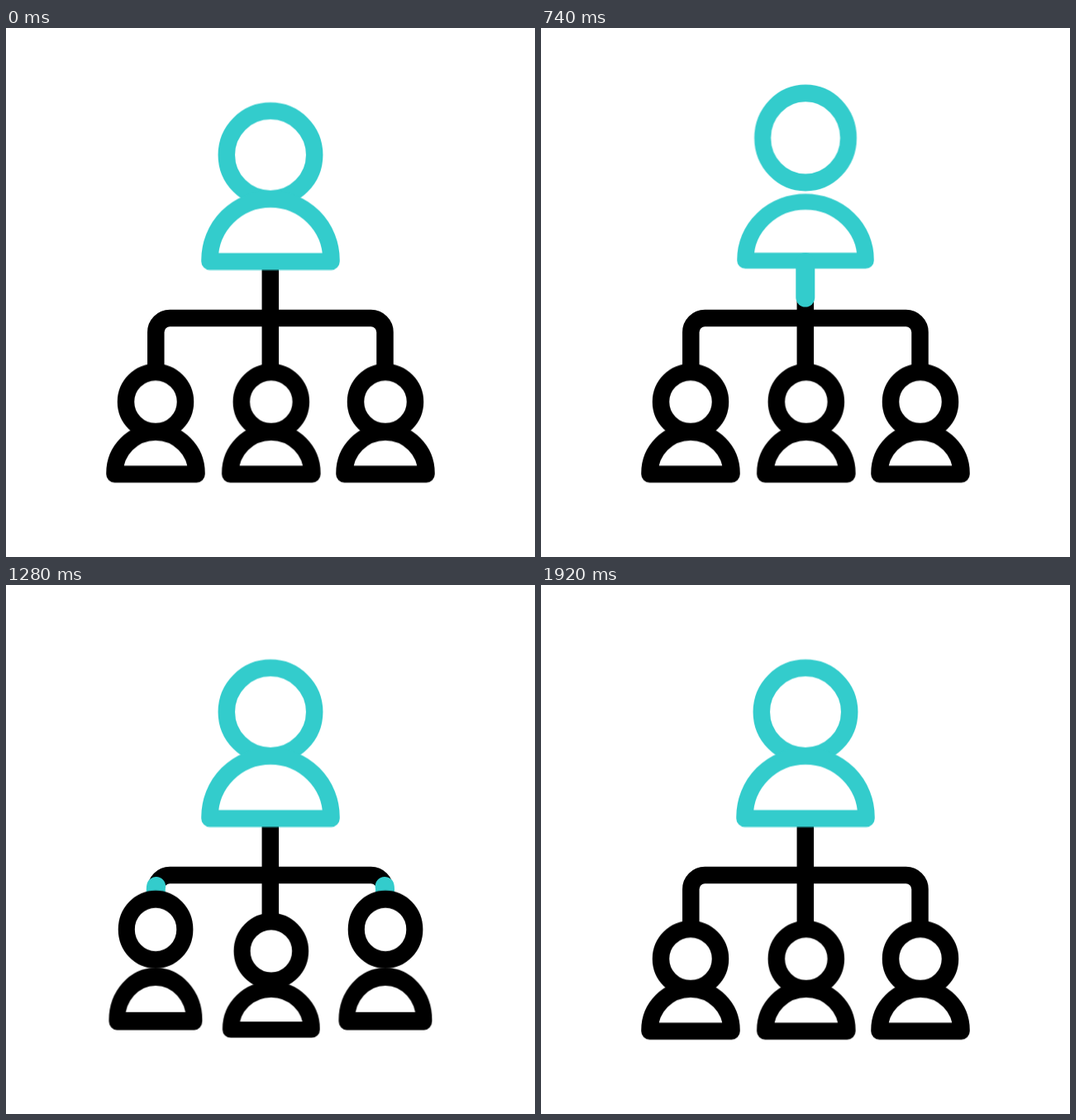
Recreate the animation shown at these times as an HTML page without scripts. Size 640 by 640 pixels, loop 1.96 s.

```html
<!DOCTYPE html>
<html lang="en">
<head>
<meta charset="utf-8">
<title>Team hierarchy</title>
<style>
  html, body { margin: 0; width: 100%; height: 100%; overflow: hidden; background: #fff; }
  svg { display: block; width: 100%; height: 100%; }

  .person, .links, .pulse { stroke-width: 20.5; stroke: #000; }
  .person { fill: #fff; stroke-linejoin: round; }
  .links, .pulse { fill: none; }
  .leader, .pulse { stroke: #3cc; }

  .leader { --start: 260ms; }
  .middle { --start: 770ms; }
  .side { --start: 900ms; }

  .head, .body {
    transform-box: fill-box;
    animation: head 1960ms linear var(--start) infinite;
  }
  .head { transform-origin: 50% 50%; }
  .body { transform-origin: 50% 100%; animation-name: body; }

  /* crouch, jump, land, small rebound */
  @keyframes head {
    0% { transform: none; animation-timing-function: ease-in; }
    8.16% { transform: translateY(4px) scale(1, .965); animation-timing-function: ease-out; }
    10.2% { transform: translateY(6.5px) scale(1, .955); animation-timing-function: ease-in; }
    13.27% { transform: translateY(-.5px) scale(1, .96); }
    16.84% { transform: translateY(-25px) scale(.98, 1.02); animation-timing-function: ease-out; }
    19.9% { transform: translateY(-36px) scale(.98, 1.02); animation-timing-function: ease-in; }
    24.49% { transform: translateY(-21px) scale(.976, 1.016); }
    26.53% { transform: translateY(-6px) scale(.98, .99); }
    29.6% { transform: translateY(7px) scale(1, .94); animation-timing-function: ease-out; }
    33.16% { transform: translateY(10px) scale(1, .912); }
    34.69% { transform: translateY(3.5px) scale(1, .93); animation-timing-function: ease-out; }
    38.78% { transform: translateY(-4px); animation-timing-function: ease-in-out; }
    45.92% { transform: translateY(-.7px); }
    48.98%, 100% { transform: none; }
  }
  @keyframes body {
    0% { transform: none; }
    8.16% { transform: translateY(-1px) scale(1, .96); }
    10.2% { transform: translateY(-1px) scale(1, .95); animation-timing-function: ease-in; }
    13.27% { transform: translateY(-5.5px) scale(1, .97); animation-timing-function: ease-out; }
    17.86% { transform: translateY(-13px) scale(.945, 1.055); }
    19.9% { transform: translateY(-12px) scale(.945, 1.055); animation-timing-function: ease-in; }
    24.49% { transform: translateY(-1px) scale(.988, .943); }
    26.53% { transform: translateY(-2px) scale(.985, .96); }
    33.16% { transform: translateY(-1px) scale(1, .945); }
    34.69% { transform: translateY(-4.8px); animation-timing-function: ease-out; }
    37.24% { transform: translateY(-6px); animation-timing-function: ease-in-out; }
    44.9%, 100% { transform: none; }
  }

  .pulse { stroke-width: 23; stroke-linecap: round; opacity: 0; stroke-dasharray: 0 2; }
  .trunk { animation: trunk 1960ms linear 660ms infinite; }
  .branch { animation: branch 1960ms linear 780ms infinite; }
  @keyframes trunk {
    0% { opacity: 1; stroke-dasharray: 0 2; stroke-dashoffset: 0; }
    13.27%, 16.84% { stroke-dasharray: 1 2; stroke-dashoffset: 0; }
    30.1% { opacity: 1; stroke-dasharray: 0 2; stroke-dashoffset: -1; }
    30.11%, 100% { opacity: 0; stroke-dasharray: 0 2; stroke-dashoffset: -1; }
  }
  @keyframes branch {
    0% { opacity: 1; stroke-dasharray: 0 2; stroke-dashoffset: 0; }
    13.78%, 15.31% { stroke-dasharray: 1 2; stroke-dashoffset: 0; }
    29.08% { opacity: 1; stroke-dasharray: 0 2; stroke-dashoffset: -1; }
    29.09%, 100% { opacity: 0; stroke-dasharray: 0 2; stroke-dashoffset: -1; }
  }
</style>
</head>
<body>
<svg viewBox="0 0 640 640">
  <path class="links" d="M319.8 275V430M181.3 425V368A17 17 0 0 1 198.3 351H441.5A17 17 0 0 1 458.5 368V425"/>

  <g class="person leader" transform="translate(320 153.5)">
    <circle class="head" r="53.2"/>
    <path class="body" d="M-73.5 129V127A73.5 73.5 0 0 1 73.5 127V129Z"/>
  </g>

  <path class="pulse trunk" pathLength="1" d="M319.8 283.5V420"/>
  <path class="pulse branch" pathLength="1" d="M319.8 351H198.3A17 17 0 0 0 181.3 368V414"/>
  <path class="pulse branch" pathLength="1" d="M319.8 351H441.5A17 17 0 0 1 458.5 368V414"/>

  <g class="person side" transform="translate(181 452.3)">
    <circle class="head" r="36"/>
    <path class="body" d="M-49.5 87.5V86A49.5 49.5 0 0 1 49.5 86V87.5Z"/>
  </g>
  <g class="person middle" transform="translate(320.8 452.3)">
    <circle class="head" r="36"/>
    <path class="body" d="M-49.5 87.5V86A49.5 49.5 0 0 1 49.5 86V87.5Z"/>
  </g>
  <g class="person side" transform="translate(459 452.3)">
    <circle class="head" r="36"/>
    <path class="body" d="M-49.5 87.5V86A49.5 49.5 0 0 1 49.5 86V87.5Z"/>
  </g>
</svg>
</body>
</html>
```
